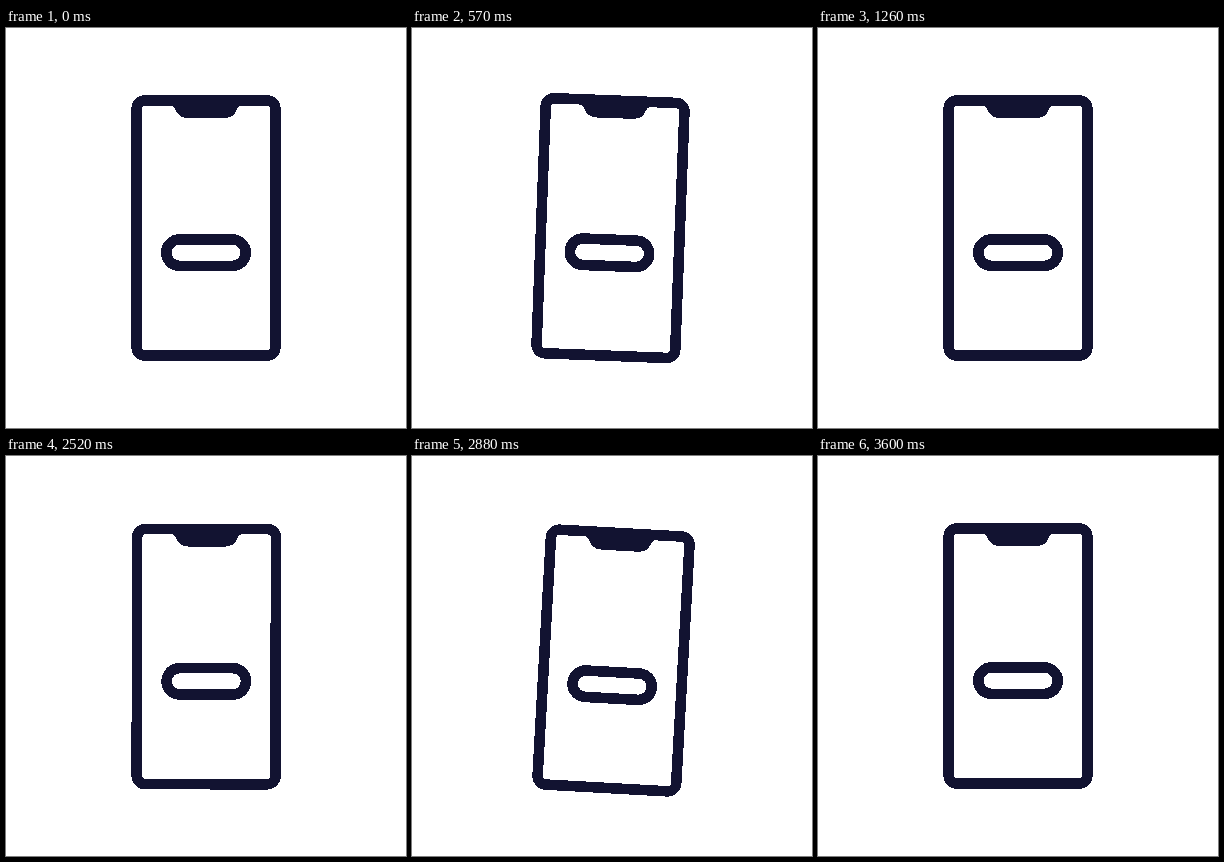
Animation of 400x400 px, one loop 5630 ms. Source, as an HTML page:

```html
<!DOCTYPE html>
<html lang="en">
<head>
<meta charset="utf-8">
<title>Phone tap</title>
<style>
  html, body { margin: 0; width: 100%; height: 100%; overflow: hidden; background: #fff; }
  svg { display: block; width: 100vw; height: 100vh; shape-rendering: crispEdges; }
  .line { fill: none; stroke: #121331; stroke-width: 10.6; }
  .solid { fill: #121331; }
</style>
</head>
<body>
<svg viewBox="0 0 400 400">
  <g id="phone">
    <rect class="line" x="130.6" y="72.4" width="138.8" height="255.2" rx="8.5"/>
    <path class="solid" d="M162 75 V77 Q167 77 169 81 Q172 90 182 90 H218 Q228 90 231 81 Q233 77 238 77 V75 Z"/>
    <rect class="line" id="pill"/>
  </g>
</svg>
<script>
  const LOOP = 5630, STEP = 30;
  const SECOND = 2490;              // start of the second tap
  const PAUSE = 285, PAUSE_LENGTH = 150; // only the first tap pauses
  const phone = document.getElementById('phone');
  const pill = document.getElementById('pill');

  // Smooth rise from 0 to 1 between two times.
  function ease(t, from, to) {
    const p = Math.min(1, Math.max(0, (t - from) / (to - from)));
    return p * p * (3 - 2 * p);
  }

  function tapTime(t) {
    if (t < SECOND) return t;
    const s = t - SECOND;
    return s < PAUSE ? s : s + PAUSE_LENGTH;
  }

  function draw(now) {
    const t = tapTime(Math.floor((now % LOOP) / STEP) * STEP);

    // Push down, swing back past the middle, then settle.
    const push = ease(t, 0, 270);
    const back = ease(t, 430, 620);
    const settle = ease(t, 700, 1260);
    const x = 10.5 * push - 14.5 * back + 4 * settle;
    const y = 17.5 * push - 21 * back + 3.5 * settle;
    const turn = 3.4 * push - 8.4 * ease(t, 520, 730) + 5 * ease(t, 730, 1260);
    phone.setAttribute('transform',
      `translate(${200 + x} ${200 + y}) rotate(${turn}) translate(-200 -200)`);

    const size = 1 - 0.19 * (ease(t, 120, 285) - ease(t, 435, 540));
    const w = 79.4 * size, h = 26.4 * size;
    const box = { x: 200 - w / 2, y: 224.7 - h / 2, width: w, height: h, rx: h / 2 };
    for (const key in box) pill.setAttribute(key, box[key]);
  }

  const start = performance.now();
  function tick() {
    draw(performance.now() - start);
    requestAnimationFrame(tick);
  }
  tick();
</script>
</body>
</html>
```
